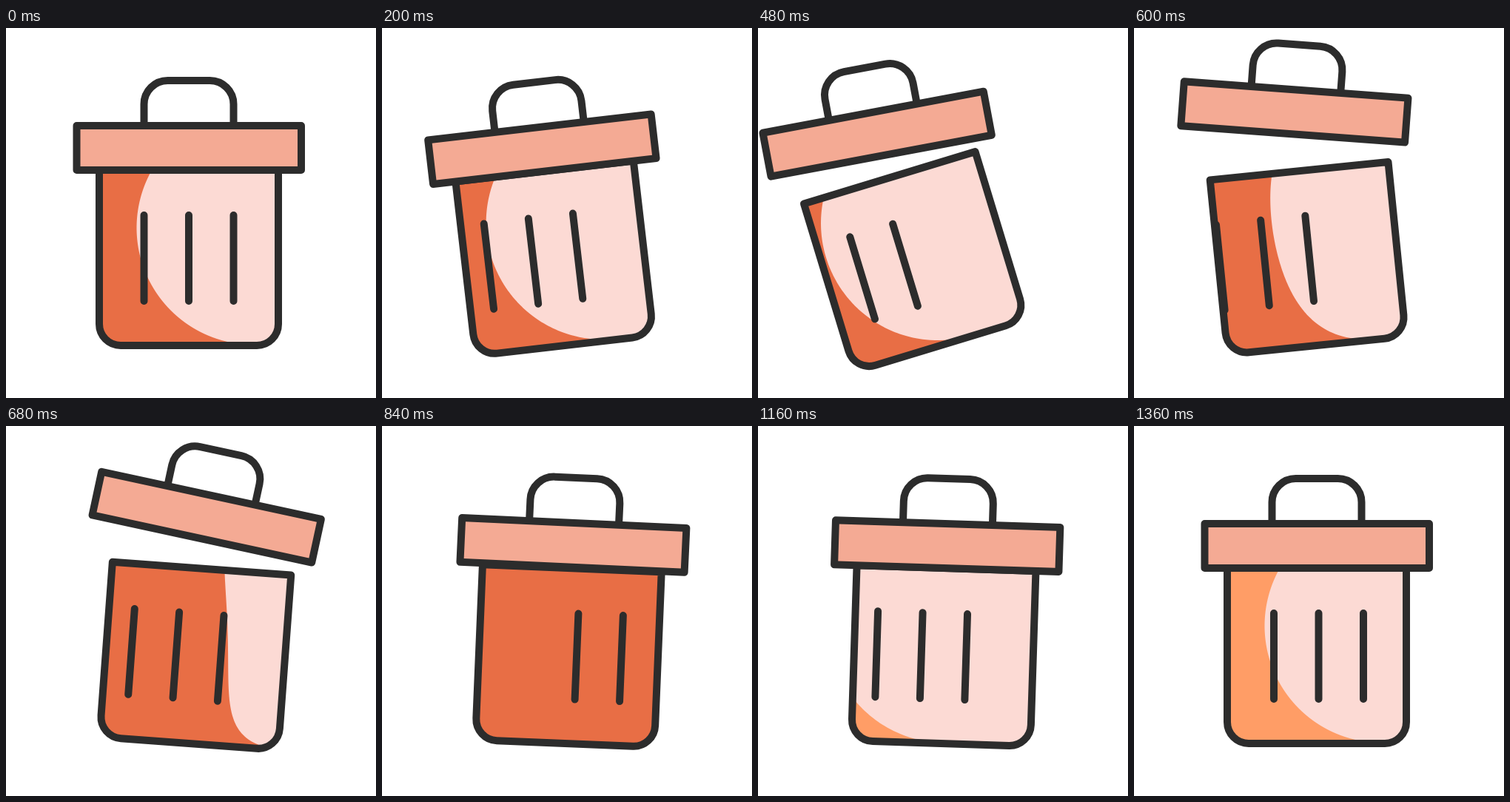
These frames come from a looping animation (500x500 px, 2 s). An HTML page:

```html
<!DOCTYPE html>
<html lang="en">
<head>
<meta charset="utf-8">
<title>Bin</title>
<style>
  html, body { margin: 0; width: 100%; height: 100%; overflow: hidden; background: #fff; }
  svg { display: block; width: 100%; height: 100%; }
  .ink { stroke: #2c2c2c; stroke-width: 10; stroke-linecap: round; stroke-linejoin: round; }
</style>
</head>
<body>
<svg viewBox="0 0 500 500">
  <defs>
    <path id="shell" d="M126 192H368V400A29 29 0 0 1 339 429H155A29 29 0 0 1 126 400Z"/>
    <path id="bars" d="M186.5 253V369M247 253V369M307.5 253V369"/>
    <clipPath id="inside"><use href="#shell"/></clipPath>
  </defs>
  <g id="bin">
    <g clip-path="url(#inside)">
      <rect x="120" y="185" width="260" height="250" fill="#e86e45"/>
      <path id="shine" fill="#fcdad4"/>
      <g id="next">
        <rect x="-200" y="185" width="534" height="250" fill="#ff9d66"/>
        <path id="nextShine" fill="#fcdad4"/>
      </g>
      <use id="barsOut" href="#bars" class="ink"/>
      <use id="barsIn" href="#bars" class="ink"/>
    </g>
    <use href="#shell" class="ink" fill="none"/>
    <g id="lid" class="ink">
      <path fill="none" d="M186.5 132V103A32 32 0 0 1 218.5 71H275.5A32 32 0 0 1 307.5 103V132"/>
      <rect x="95.5" y="132" width="303.5" height="60" fill="#f4aa94"/>
    </g>
  </g>
</svg>
<script>
  const LOOP = 2000, STEP = 40;
  const TURN = 303; // distance between the outgoing and incoming bars
  const el = id => document.getElementById(id);
  const move = (id, value) => el(id).setAttribute('transform', value);

  // Smooth 0..1 progress between two times.
  function ease(t, from, to) {
    const u = Math.min(1, Math.max(0, (t - from) / (to - from)));
    return u * u * (3 - 2 * u);
  }

  // The bin rocks back and forth, each peak about half the last.
  const turns = [0, 470, 750, 935, 1135, 1350];
  const peak = n => n === 0 || n === turns.length - 1 ? 0 : -17 * (-0.48) ** (n - 1);
  function swing(t) {
    let angle = 0;
    for (let n = 1; n < turns.length; n++) {
      angle += (peak(n) - peak(n - 1)) * ease(t, turns[n - 1], turns[n]);
    }
    return angle;
  }

  // Highlight with a circular left edge, pushed sideways by shift(y).
  function highlight(shift, rightSide) {
    const points = [];
    for (let y = 186; y <= 428; y += 2) {
      const x = 334.5 - Math.sqrt(158 ** 2 - (y - 270) ** 2) + shift(y);
      points.push(`${x.toFixed(2)} ${y}`);
    }
    return `M${points.join('L')}V440${rightSide}Z`;
  }

  function draw(t) {
    const lift = ease(t, 330, 586) - ease(t, 604, 866);
    const bars = -74.5 * ease(t, 0, 470) + (TURN + 77) * ease(t, 500, 1305);
    const drift = -43.5 * ease(t, 0, 470);
    const throwOut = 2 * ease(t, 470, 890);
    const bulge = y => 112 - 0.0036 * (y - 285) ** 2;

    move('bin', `rotate(${swing(t)} 247 430)`);
    move('lid', `translate(${1.6 * lift} ${-50 * lift}) rotate(${10 * lift} 247 162)`);
    move('barsOut', `translate(${bars})`);
    move('barsIn', `translate(${bars - TURN})`);
    move('next', `translate(${400 * (ease(t, 800, 1315) - 1)})`);
    el('shine').setAttribute('d',
      highlight(y => drift + (bulge(y) - drift) * throwOut, 'H700V186'));
  }

  el('nextShine').setAttribute('d', highlight(() => 0, 'H480A383 383 0 0 0 507 186'));

  const start = performance.now();
  function tick() {
    const t = (performance.now() - start) % LOOP;
    draw(Math.floor(t / STEP) * STEP);
    requestAnimationFrame(tick);
  }
  tick();
</script>
</body>
</html>
```
